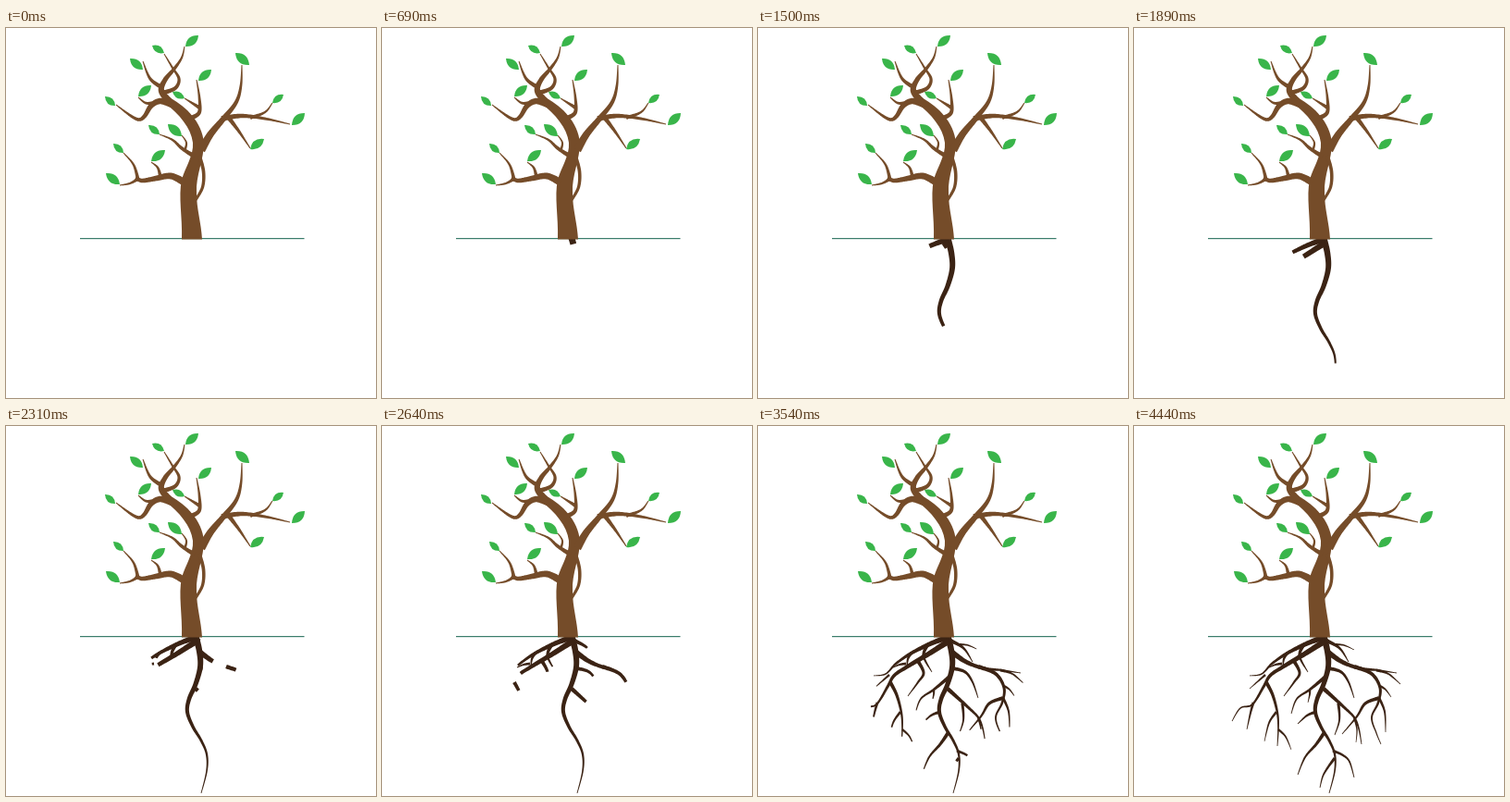
Write an HTML page with a canvas that moves like this. It is 400x400 px and loops after 5400 ms.

```html
<!DOCTYPE html>
<html>
<head>
<meta charset="utf-8">
<style>
html, body { margin: 0; width: 100%; height: 100%; overflow: hidden; background: #fff; }
canvas { display: block; }
</style>
</head>
<body>
<canvas id="stage" width="400" height="400"></canvas>
<script>
const LOOP = 5400, STEP = 30;
const BARK = '#754c29', ROOT = '#3b2314', LEAF = '#39b54a', GROUND = '#3a7c6b';
const ctx = document.getElementById('stage').getContext('2d');

// Smooth curve through the points, sampled as [x, y]
function curve(text) {
  const p = text.split(' ').map(s => s.split(',').map(Number));
  const at = i => p[Math.max(0, Math.min(p.length - 1, i))];
  const out = [];
  for (let i = 0; i < p.length - 1; i++) {
    const [a, b, c, d] = [at(i - 1), at(i), at(i + 1), at(i + 2)];
    for (let u = 0; u < 1; u += 1 / 16) {
      out.push([0, 1].map(k => b[k] + u / 2 * (c[k] - a[k] +
        u * (2 * a[k] - 5 * b[k] + 4 * c[k] - d[k] + u * (3 * (b[k] - c[k]) + d[k] - a[k])))));
    }
  }
  out.push(at(p.length - 1));
  return out;
}

const limb = (text, w0, w1, start, end) => {
  const pts = curve(text);
  const dist = [0];
  for (let i = 1; i < pts.length; i++) {
    dist.push(dist[i - 1] + Math.hypot(pts[i][0] - pts[i - 1][0], pts[i][1] - pts[i - 1][1]));
  }
  return { pts, dist, w0, w1, start, end };
};

// Fill the tapered limb up to the given share of its length
function drawLimb({ pts, dist, w0, w1 }, share) {
  if (share <= 0) return;
  const total = dist[dist.length - 1], reach = total * Math.min(1, share);
  const left = [], right = [];
  for (let i = 0; i < pts.length; i++) {
    const a = pts[Math.max(0, i - 1)], b = pts[Math.min(pts.length - 1, i + 1)];
    const len = Math.hypot(b[0] - a[0], b[1] - a[1]) || 1;
    let [x, y] = pts[i], d = dist[i];
    const last = d >= reach;
    if (last && i) {
      const k = (reach - dist[i - 1]) / (d - dist[i - 1]);
      x = a[0] + (x - a[0]) * k;
      y = a[1] + (y - a[1]) * k;
      d = reach;
    }
    const h = (w0 + (w1 - w0) * d / total) / 2 / len;
    const nx = (a[1] - b[1]) * h, ny = (b[0] - a[0]) * h;
    left.push([x + nx, y + ny]);
    right.unshift([x - nx, y - ny]);
    if (last) break;
  }
  ctx.beginPath();
  left.concat(right).forEach(q => ctx.lineTo(...q));
  ctx.fill();
}

function drawLeaf(x0, y0, x1, y1) {
  const dx = x1 - x0, dy = y1 - y0;
  const side = s => [x0 + dx * .5 - dy * s, y0 + dy * .5 + dx * s];
  ctx.beginPath();
  ctx.moveTo(x0, y0);
  ctx.quadraticCurveTo(...side(.48), x1, y1);
  ctx.quadraticCurveTo(...side(-.48), x0, y0);
  ctx.fill();
}

const trunk = new Path2D('M190 228.5C191 205 186 182 190 164C194 150 203 138 202 124' +
  'C200 108 188 94 172 81L178 76C195 85 212 102 214 124C214 142 205 160 206 178C206 196 211 210 212 228.5Z');

const branches = [
  limb('209,138 213.5,155 212.5,172 205,186', 4, 3),
  limb('193,167 178,160 160,163 147,165 140,162', 8, 4),
  limb('143,163 134,168 123,170', 3.5, 1),
  limb('143,165 138,148 127,135', 4, 1),
  limb('167,161 164,151 157,145', 4, 1),
  limb('204,139 190,130 180,121 166,115', 5, 1),
  limb('193,133 195,124 190,116', 3, 1),
  limb('181,83 167,79 157,84 150,95 144,99 135,95 119,83', 8, 1),
  limb('160,81 151,81 143,75', 4, 1),
  limb('178,81 168,68 172,56 182,44 190,32 193,20', 8, 1),
  limb('170,70 183,65 187,55 180,43 171,28', 5, 1),
  limb('170,65 156,55 148,36', 5, 1),
  limb('201,97 209,91 209,75 206,56', 5, 1),
  limb('209,86 201,81 193,76', 4, 1),
  limb('211,132 221,115 236,97 249,80 254,62 255,40', 9, 1),
  limb('233,98 255,95 280,98 307,104', 6, 1),
  limb('264,97 280,91 288,81', 4, 1),
  limb('240,96 252,112 264,130', 5, 1)
];

const leaves = [
  [194, 20, 208, 8], [171, 27, 158, 19], [148, 45, 134, 33], [208, 57, 222, 45],
  [263, 40, 248, 27], [143, 74, 157, 62], [118, 84, 107, 74], [193, 76, 180, 69],
  [288, 81, 300, 72], [309, 105, 323, 92], [264, 131, 279, 120], [166, 115, 154, 105],
  [190, 117, 175, 104], [157, 144, 172, 132], [127, 135, 116, 125], [123, 169, 108, 157]
];

const roots = [
  // tap root and its side shoots
  limb('205,227 209,243 210,260 205,279 198,295 196,309 202,325 211,340 217,355 217,373 211,397', 7, .8, 630, 2200),
  limb('207,271 190,285 176,295 170,311', 4, .8, 2700, 3600),
  limb('190,285 190,290 188,299', 2.5, .6, 3150, 3700),
  limb('211,262 224,266 232,277 238,294', 4, .8, 2280, 3100),
  limb('205,284 215,293 227,304 238,315 243,327 246,344', 4.5, .8, 2250, 3650),
  limb('221,300 222,318 217,334', 3.2, .8, 2760, 3650),
  limb('238,315 241,328 240,342', 2.2, .6, 3300, 3800),
  limb('197,309 187,313 177,322', 3.5, .8, 2940, 3750),
  limb('206,331 197,344 185,358 177,377', 4, .8, 2880, 3630),
  limb('215,351 226,356 233,363 238,380', 3, .8, 3330, 4000),
  limb('217,359 209,370 204,379 201,391', 3.2, .8, 3420, 4440),
  // left side
  limb('203,229 185,236 165,246 149,257 138,268 125,270', 6, .8, 1020, 3300),
  limb('207,232 185,246 160,261 147,270 140,282 128,301 115,305 106,319', 6.5, .8, 1350, 4000),
  limb('160,257 153,258 146,261', 3, 1, 2250, 2640),
  limb('142,269 134,276 125,284', 2.5, .6, 3000, 3650),
  limb('183,237 179,249 188,266', 4, .8, 2040, 2800),
  limb('166,245 162,252 161,262', 3.5, .8, 2070, 2700),
  limb('173,254 179,267 173,277 162,292', 4, .8, 2430, 3150),
  limb('143,277 150,291 155,310 156,326 155,346', 4, .8, 2460, 3720),
  limb('154,309 146,321 141,341', 2.8, .6, 3090, 3900),
  limb('156,328 164,336 170,350', 2.5, .6, 3150, 3750),
  limb('129,299 126,310 122,328', 3, .7, 3120, 3900),
  // right side
  limb('206,231 222,240 232,255', 4.5, .8, 2220, 3060),
  limb('215,236 227,237 238,242', 2.5, .6, 2850, 3600),
  limb('209,244 225,255 244,262 264,264 284,267', 6, .8, 1980, 3450),
  limb('238,260 257,268 266,283 264,299 257,315 262,332 267,344', 4.5, .8, 2130, 3780),
  limb('262,264 275,268 288,279', 3, .7, 2730, 3600),
  limb('266,281 272,285 278,293', 2.5, .6, 3000, 3600),
  limb('265,294 250,300 241,314 225,333', 4, .8, 2700, 3630),
  limb('265,294 271,309 272,331', 3, .7, 2820, 3660)
];

function draw(now) {
  const t = Math.floor(now % LOOP / STEP) * STEP;
  ctx.fillStyle = '#fff';
  ctx.fillRect(0, 0, 400, 400);
  ctx.fillStyle = GROUND;
  ctx.fillRect(80, 227, 242.5, 1.2);
  ctx.fillStyle = ROOT;
  roots.forEach(r => drawLimb(r, (t - r.start) / (r.end - r.start)));
  ctx.fillStyle = BARK;
  ctx.fill(trunk);
  branches.forEach(b => drawLimb(b, 1));
  ctx.fillStyle = LEAF;
  leaves.forEach(l => drawLeaf(...l));
}

const begin = performance.now();
function tick() {
  draw(performance.now() - begin);
  requestAnimationFrame(tick);
}
tick();
</script>
</body>
</html>
```
